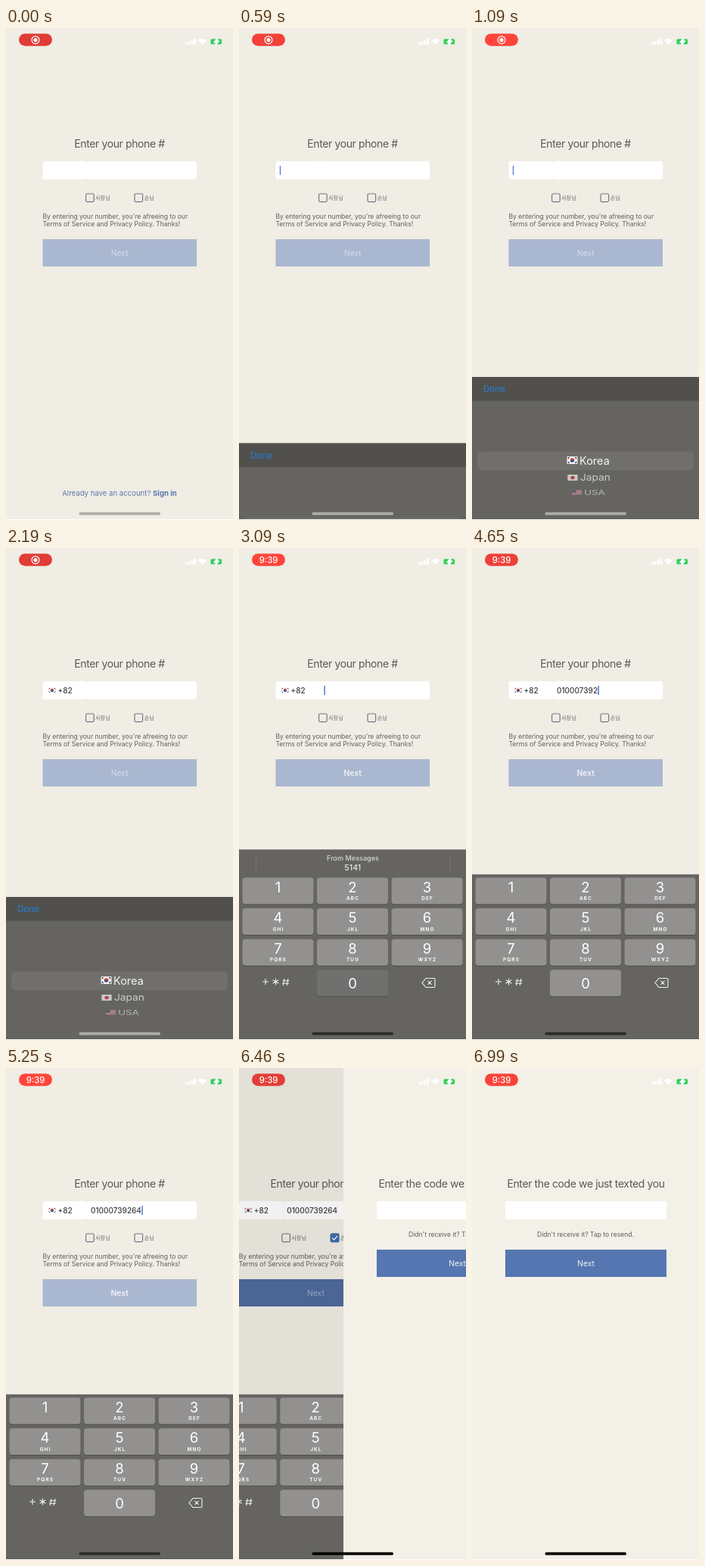
Animation, 300 px wide and 650 px high, one loop 7.06 s. Source, as an HTML page:

```html
<!DOCTYPE html>
<html lang="en">
<head>
<meta charset="utf-8">
<title>Phone sign-up</title>
<style>
  html, body { margin: 0; height: 100%; overflow: hidden; background: #f0ede4; }
  svg { display: block; width: 100vw; height: 100vh; font-family: Inter, "Noto Sans CJK KR", "Noto Sans CJK", sans-serif; }
  .title { font-size: 14px; letter-spacing: -.028em; fill: #5b5955; text-anchor: middle; }
  .small { font-size: 8.55px; fill: #5f5d59; }
  .label { font-size: 7.2px; fill: #6c6a66; }
  .button { font-size: 10.3px; fill: #eff2f7; text-anchor: middle; }
  .value { font-size: 10px; font-weight: 500; fill: #3a3b3e; }
  .mid { text-anchor: middle; }
  .box { fill: none; stroke: #74778a; stroke-width: 1.2; }
  .caret { fill: #5b7ddd; }
  .digit { font-size: 18.5px; fill: #fff; text-anchor: middle; }
  .letters { font-size: 6.4px; font-weight: 700; letter-spacing: 1.1px; fill: #fafaf8; text-anchor: middle; }
  .wheel { font-size: 14.5px; fill: #f4f4f2; }
</style>
</head>
<body>
<svg viewBox="0 0 300 650">
  <defs>
    <g id="korea">
      <rect x="-7" y="-5" width="14" height="10" rx="1" fill="#f5f3f1"/>
      <path d="M-2.8 0a2.8 2.8 0 0 1 5.6 0z" fill="#d23b43"/>
      <path d="M-2.8 0a2.8 2.8 0 0 0 5.6 0z" fill="#2f4f92"/>
      <path d="M-5.6-2l1.6-2M4-4l1.6 2M-5.6 2l1.6 2M4 4l1.6-2" stroke="#333" stroke-width="1.3"/>
    </g>
    <g id="japan">
      <rect x="-7" y="-5" width="14" height="10" rx="1" fill="#f1efed"/>
      <circle r="2.8" fill="#cf3a42"/>
    </g>
    <g id="usa">
      <rect x="-7" y="-5" width="14" height="10" rx="1" fill="#e9e2e0"/>
      <path d="M-7-4H7M-7-1H7M-7 2H7M-7 4.5H7" stroke="#c8414a" stroke-width="1.4"/>
      <rect x="-7" y="-5" width="6" height="5" fill="#39507f"/>
    </g>
  </defs>

  <g id="phonePage">
    <rect width="300" height="650" fill="#f0ede4"/>
    <text class="title" x="150" y="157.5">Enter your phone #</text>
    <rect x="48.5" y="176" width="58.5" height="24" rx="3.5" fill="#fff"/>
    <rect x="107" y="176" width="145" height="24" rx="3.5" fill="#fff"/>
    <g id="country">
      <use href="#korea" transform="translate(61 188) scale(.76)"/>
      <text class="value" x="68.5" y="191.7">+82</text>
    </g>
    <text class="value" id="number" x="112" y="191.7"></text>
    <rect class="caret" id="codeCaret" x="53.8" y="182" width="1.4" height="12"/>
    <rect class="caret" id="numberCaret" y="182" width="1.6" height="12"/>
    <rect class="box" x="105.6" y="219" width="10.6" height="10.6" rx="1.5"/>
    <text class="label" x="118" y="227">사장님</text>
    <rect class="box" x="170" y="219" width="10.6" height="10.6" rx="1.5"/>
    <g id="check">
      <rect x="169.4" y="218.4" width="11.8" height="11.8" rx="1.5" fill="#426cb0"/>
      <path d="M172 224.5l2.4 2.4 4.4-5" fill="none" stroke="#fff" stroke-width="1.3"/>
    </g>
    <text class="label" x="182.7" y="227">손님</text>
    <text class="small" x="48.5" y="251.7">By entering your number, you're afreeing to our</text>
    <text class="small" x="48.5" y="261.9">Terms of Service and Privacy Policy. Thanks!</text>
    <rect id="nextBox" x="48.5" y="279" width="203.5" height="36"/>
    <text class="button" id="nextText" x="150.2" y="301">Next</text>
    <text x="150" y="618.3" font-size="9.6" fill="#5b78ad" class="mid">Already have an account? <tspan font-weight="700">Sign in</tspan></text>
    <rect id="dim" width="300" height="650"/>

    <g id="picker">
      <rect y="461" width="300" height="200" fill="#656461"/>
      <rect y="461" width="300" height="31.5" fill="#51504c"/>
      <text x="15" y="481.3" font-size="11.6" font-weight="500" fill="#2878c8" id="done">Done</text>
      <rect x="7" y="559.5" width="286" height="24.5" rx="5" fill="#706f6c"/>
      <use href="#korea" x="132.5" y="571"/>
      <text class="wheel" x="142" y="577">Korea</text>
      <g transform="translate(133 594) scale(.95 .82)" opacity=".72">
        <use href="#japan"/><text class="wheel" x="10.5" y="5.2">Japan</text>
      </g>
      <g transform="translate(138.5 613.5) scale(.92 .6)" opacity=".55">
        <use href="#usa"/><text class="wheel" x="10.5" y="5.2">USA</text>
      </g>
    </g>

    <g id="keyboard">
      <g id="suggestion">
        <rect y="398.3" width="300" height="34" fill="#656461"/>
        <path d="M22.5 407v20M278.5 407v20" stroke="#777672"/>
        <text class="mid" x="150.5" y="413.3" font-size="9.1" font-weight="500" fill="#d6d6d3">From Messages</text>
        <text class="mid" x="150.3" y="426.3" font-size="10.6" font-weight="500" fill="#e6e6e3">5141</text>
      </g>
      <rect y="431.2" width="300" height="230" fill="#656461"/>
      <g id="keys"></g>
      <g fill="none" stroke="#f0f0ee" stroke-width="1.1">
        <path d="M31 573h8M35 569v8M48.5 568.5v9M44.6 570.8l7.8 4.5M44.6 575.3l7.8-4.5M60 569l-1.6 9M64.8 569l-1.6 9M57.5 571.7h9M57 575.3h9"/>
        <path d="M247 568.5h10.5q1.5 0 1.5 1.5v9q0 1.5-1.5 1.5H247l-5-6zM249.5 571.8l5 5M254.5 571.8l-5 5"/>
      </g>
    </g>
  </g>

  <g id="codePage">
    <rect width="301" height="650" fill="#f3f0e7"/>
    <text class="title" x="150.5" y="157.5">Enter the code we just texted you</text>
    <rect x="44" y="176" width="213" height="24" rx="3" fill="#fff"/>
    <text class="small mid" x="150" y="223">Didn't receive it? Tap to resend.</text>
    <rect x="44" y="240" width="213" height="36" fill="#5576b0"/>
    <text class="button" x="150.5" y="262">Next</text>
  </g>

  <rect id="pill" x="17" y="7.5" width="44" height="16.2" rx="8.1"/>
  <g id="record" fill="none" stroke="#fff" stroke-width="1.2">
    <circle cx="39" cy="15.8" r="5"/><circle cx="39" cy="15.8" r="2" fill="#fff"/>
  </g>
  <text class="mid" id="clock" x="39" y="19.7" font-size="11.3" font-weight="500" fill="#fff">9:39</text>
  <g fill="#fff">
    <path d="M237 19h2.6v3H237zM240.8 17.5h2.6V22h-2.6zM244.6 15.7h2.6V22h-2.6zM248.4 14h2.6v8h-2.6z"/>
    <path d="M259.5 22l-5.5-5.5q5.5-5 11 0z"/>
    <rect x="270.5" y="14.5" width="14.5" height="7" rx="1.5" fill="#30cf58"/>
    <path d="M279.5 13.5l-4 5h2.2l-.7 4 4-5h-2.3z" stroke="#fff" stroke-width="1.8"/>
  </g>
  <rect id="home" x="96.5" y="639.8" width="107.5" height="3.8" rx="1.9"/>
  <rect y="649" width="300" height="1" fill="#fff"/>
</svg>

<script>
const LOOP = 7060;
const PHONE = "01000739264";
const FIRST_KEY = 3060, KEY_STEP = 185, KEY_HOLD = 90;
const el = id => document.getElementById(id);
const set = (id, name, value) => el(id).setAttribute(name, value);
const show = (id, on) => set(id, "opacity", +on);
const ramp = (t, from, to) => Math.min(1, Math.max(0, (t - from) / (to - from)));
const easeOut = x => 1 - (1 - x) ** 3;
const move = (id, x, y) => set(id, "transform", `translate(${x} ${y})`);

// Number pad, three columns wide, with 0 in the middle of the last row
const letters = ["", "", "ABC", "DEF", "GHI", "JKL", "MNO", "PQRS", "TUV", "WXYZ"];
el("keys").innerHTML = letters.map((word, n) => {
  const slot = n ? n - 1 : 10;
  const x = 4.5 + slot % 3 * 98.5, y = 435.5 + Math.floor(slot / 3) * 40.6;
  return `<rect x="${x}" y="${y + 1}" width="94" height="35" rx="4" fill="#4c4b48"/>
    <rect id="key${n}" x="${x}" y="${y}" width="94" height="35" rx="4"/>
    <text class="digit" x="${x + 47}" y="${y + (n ? 19 : 24.5)}">${n}</text>
    <text class="letters" x="${x + 47.5}" y="${y + 29.5}">${word}</text>`;
}).join("");

function typeNumber(t) {
  const since = t - FIRST_KEY;
  const index = Math.floor(since / KEY_STEP);
  const pressed = since >= 0 && since % KEY_STEP < KEY_HOLD ? PHONE[index] : undefined;
  for (let n = 0; n < 10; n++) set("key" + n, "fill", String(n) === pressed ? "#70706e" : "#929190");
  const count = Math.max(0, Math.floor((since - 80) / KEY_STEP) + 1);
  el("number").textContent = PHONE.slice(0, count);
  set("numberCaret", "x", 112.3 + (count && el("number").getComputedTextLength()));
}

function draw(t) {
  const pulse = (1 - Math.cos(t / 2080 * 2 * Math.PI)) / 2;
  set("pill", "fill", `rgb(${224 + 31 * pulse} ${60 + 9 * pulse} ${53 + 6 * pulse})`);
  const clock = ramp(t, 2350, 2500);
  set("record", "opacity", 1 - clock);
  set("clock", "opacity", clock);

  const pickerUp = easeOut(ramp(t, 500, 900)) - easeOut(ramp(t, 2450, 2750));
  move("picker", 0, 190 * (1 - pickerUp));
  set("done", "opacity", t > 2300 && t < 2450 ? 0.4 : 1);
  move("keyboard", 0, 252 * (1 - easeOut(ramp(t, 2700, 3000))));
  show("suggestion", t < 3170);
  show("codeCaret", t > 500 && t < 1700);
  show("numberCaret", t > 2700 && t < 6300);
  show("country", t >= 1700);
  typeNumber(t);

  const checked = t >= 5700, tapped = t >= 6200;
  show("check", checked);
  set("nextBox", "fill", tapped ? "#4f6b9d" : checked ? "#5576b0" : "#aab7d0");
  set("nextText", "fill-opacity", tapped ? 0.5 : t < 2700 ? 0.65 : 1);
  set("nextText", "font-weight", t < 2700 || tapped ? 400 : 600);

  // Push to the code page with a critically damped spring
  const s = Math.max(0, t - 6340) * 0.015;
  const push = 1 - (1 + s) * Math.exp(-s);
  move("phonePage", -90 * push, 0);
  set("dim", "opacity", 0.1 * push);
  move("codePage", Math.round(300 * (1 - push)), 0);
  set("home", "fill", t < 2700 ? "#aeaca8" : t < 6340 ? "#2b2b29" : "#000");
}

function tick() {
  draw(performance.now() % LOOP);
  requestAnimationFrame(tick);
}
tick();
</script>
</body>
</html>
```
